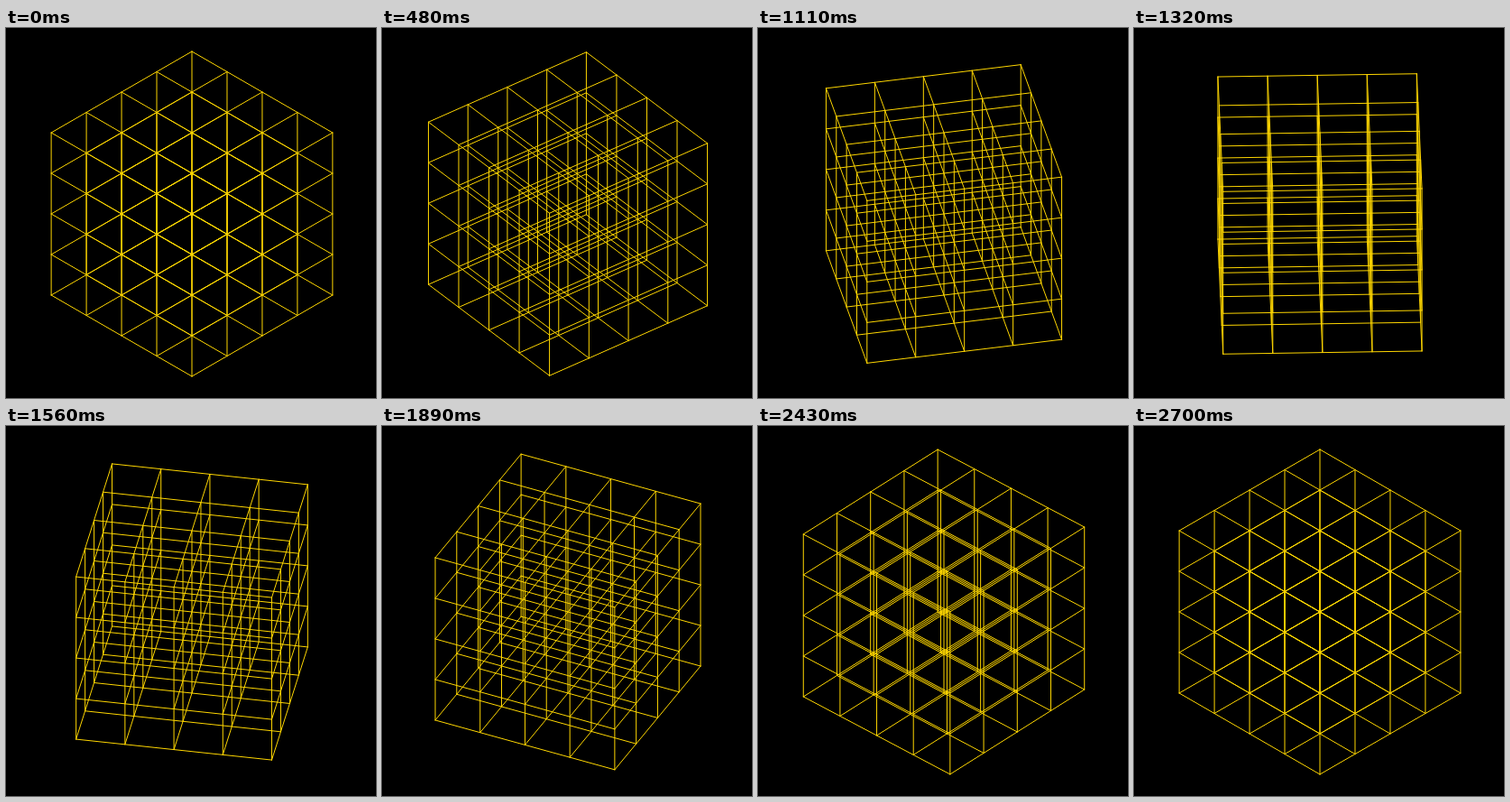
Animation of 410 by 410 pixels, one loop 2.73 s. Source, as an HTML page with a canvas:

```html
<!DOCTYPE html>
<html lang="en">
<head>
<meta charset="utf-8">
<title>Turning lattice</title>
<style>
  html, body { margin: 0; width: 100%; height: 100%; overflow: hidden; background: #000; }
  canvas { display: block; }
</style>
</head>
<body>
<canvas id="stage" width="410" height="410"></canvas>
<script>
const ctx = document.getElementById('stage').getContext('2d');
const STEP = 30, STEPS = 91;
const CELLS = 4, RADIUS = 180, CENTER = 206;
const HALF_WIDTH = RADIUS * Math.sqrt(3) / 2;
const smoothstep = p => p * p * (3 - 2 * p);

// Isometric view of lattice coordinates 0..CELLS, turned about the vertical axis.
function project(i, j, k, angle) {
  const u = i / CELLS - 0.5, v = j / CELLS - 0.5, w = k / CELLS - 0.5;
  const across = u - v, depth = u + v;
  const c = Math.cos(angle), s = Math.sin(angle);
  return [
    CENTER + HALF_WIDTH * (across * c - depth * s),
    CENTER + RADIUS / 2 * (depth * c + across * s) + RADIUS * w
  ];
}

function draw(time) {
  const step = Math.floor(time / STEP) % STEPS;
  const angle = smoothstep(step / (STEPS - 1)) * Math.PI / 2;
  const line = (from, to) => {
    ctx.moveTo(...project(...from, angle));
    ctx.lineTo(...project(...to, angle));
  };

  ctx.fillStyle = '#000';
  ctx.fillRect(0, 0, 410, 410);
  ctx.beginPath();
  for (let a = 0; a <= CELLS; a++) {
    for (let b = 0; b <= CELLS; b++) {
      line([0, a, b], [CELLS, a, b]);
      line([a, 0, b], [a, CELLS, b]);
      line([a, b, 0], [a, b, CELLS]);
    }
  }
  ctx.strokeStyle = '#ffd700';
  ctx.lineWidth = 1;
  ctx.lineCap = 'round';
  ctx.stroke();
}

const start = performance.now();
function tick() {
  draw(performance.now() - start);
  requestAnimationFrame(tick);
}
tick();
</script>
</body>
</html>
```
